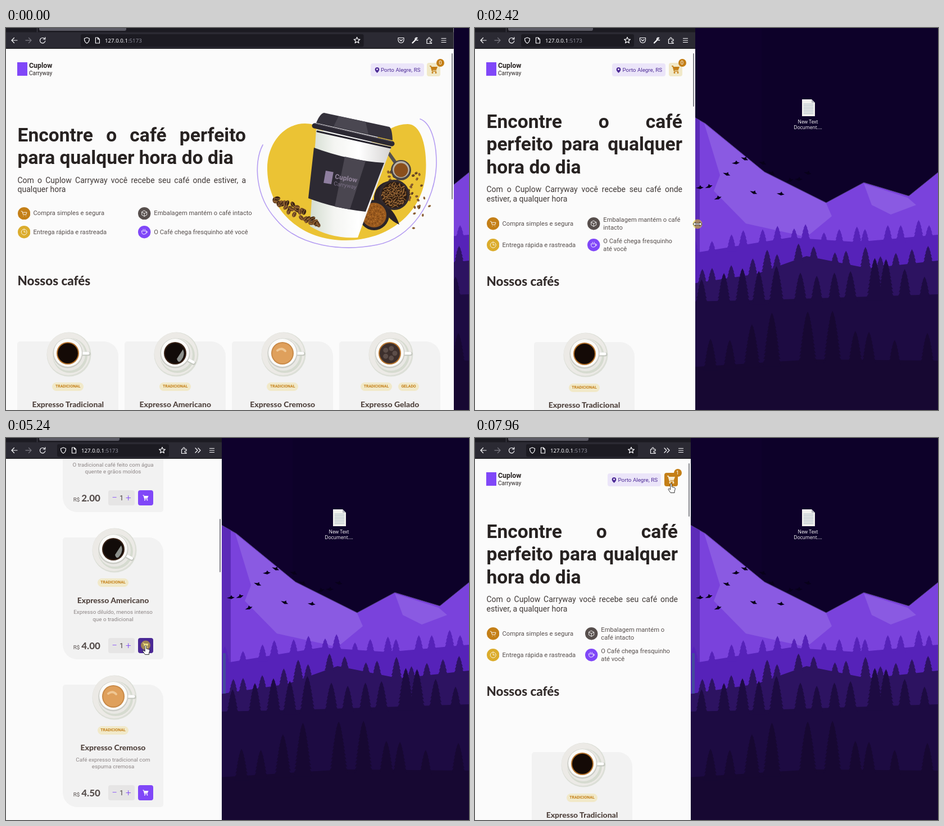
Write an HTML page that moves like this. It is 824 px wide and 680 px high and loops after 8 s.

```html
<!DOCTYPE html>
<html lang="pt-BR">
<head>
<meta charset="utf-8">
<title>Loja de cafés</title>
<style>
html, body { margin: 0; width: 100%; height: 100%; overflow: hidden; background: #0d0129; }
#stage { position: absolute; left: 0; top: 0; width: 824px; height: 680px; overflow: hidden; font-family: Roboto, sans-serif; }
#stage > svg { position: absolute; left: 0; top: 0; }
#win, #view { position: absolute; left: 0; overflow: hidden; }
#win { top: 0; height: 680px; background: #fff; }
#view { top: 37px; height: 643px; background: #fbfbfb; }
#bar { position: absolute; left: 0; top: 0; }
#page { position: absolute; left: 0; top: -37px; box-sizing: border-box; padding: 147px 23.5px 0 20.5px; }
#page > svg, .abs { position: absolute; }
h1, h2, h3, p { margin: 0; }
#hero { display: flex; flex-direction: column; justify-content: center; }
h1 { font-size: 33.6px; line-height: 40.32px; color: #272221; text-align: justify; }
#hero p { margin: 11.2px 0 22.4px; font-size: 14px; line-height: 16.8px; color: #403937; text-align: justify; }
#feats { display: grid; grid-template-columns: 1fr 1fr; gap: 11.2px; }
#feats div { display: flex; align-items: center; gap: 5.6px; font-size: 11.2px; line-height: 13.44px; color: #574f4d; }
#feats svg { flex: none; }
h2, h3, .price b { font-family: Lato, sans-serif; font-weight: 800; }
h2 { margin-top: 37px; font-size: 22.4px; line-height: 28px; color: #332c2b; }
#cards { display: flex; flex-wrap: wrap; justify-content: center; gap: 45px 11.4px; margin: 94px -2px 0; }
.card { position: relative; width: 179.6px; height: 217.5px; background: #f2f2f2; border-radius: 5px 26px 5px 26px; text-align: center; }
.card > * { position: absolute; }
.cup { left: 50px; top: -20px; }
.tags { top: 73.5px; width: 100%; display: flex; justify-content: center; gap: 11px; }
.tags b { height: 15px; line-height: 15.5px; padding: 0 5.6px; border-radius: 8px; background: #f1e9c9; color: #c47f17; font-size: 6.9px; }
h3 { top: 102px; width: 100%; font-size: 14px; line-height: 19px; color: #51443f; }
.card p { top: 127.5px; width: 100%; font-size: 9.8px; line-height: 12.5px; color: #8d8686; white-space: nowrap; }
.price { left: 19px; top: 182px; font-size: 9.8px; line-height: 22px; color: #574f4d; }
.price b { font-size: 17px; margin-left: 3px; }
.qty { left: 81px; top: 179px; width: 47.5px; height: 27px; border-radius: 4px; background: #e6e5e5; font-size: 12px; line-height: 27px; color: #403937; }
.qty i { font: 300 17px/26px Roboto, sans-serif; color: #8047f8; vertical-align: -1px; margin: 0 4px; }
.add { left: 134px; top: 179px; border-radius: 4px; background: #8047f8; }
#pill { right: 53px; top: 63px; width: 95px; height: 23px; border-radius: 4px; background: #ebe5f9; color: #4b2995; font-size: 9.8px; line-height: 23px; white-space: nowrap; }
#pill span { position: absolute; left: 18.5px; }
#basket { right: 23.5px; top: 62px; border-radius: 4px; }
#badge { right: 16.5px; top: 55px; width: 14px; height: 14px; border-radius: 50%; background: #c47f17; color: #fff; font-size: 9.5px; line-height: 14.5px; text-align: center; }
#thumb { position: absolute; width: 2px; border-radius: 1px; background: #85858c; }
#toast { position: absolute; left: 148px; top: 50px; width: 219px; height: 45.5px; background: #fff; border-radius: 3px; box-shadow: 0 1px 7px rgba(0,0,0,.18); overflow: hidden; color: #757575; font-size: 11.3px; line-height: 46px; }
#toast span { position: absolute; left: 31px; }
#left { position: absolute; bottom: 0; left: 0; width: 100%; height: 3.5px; background: #07bc0c; transform-origin: left; }
</style>
</head>
<body>
<div id="stage">
  <svg id="wall" width="824" height="680"></svg>
  <div id="win">
    <div id="view"><div id="page">
      <svg width="90" height="40" style="left:16px;top:54px" viewBox="16 54 90 40">
        <rect x="20" y="61" width="18" height="24" fill="#8047f8"/>
        <text x="41" y="71" font-size="12.4" font-weight="700" fill="#272221">Cuplow</text>
        <text x="41" y="84" font-size="10" fill="#272221">Carryway</text>
      </svg>
      <div id="pill" class="abs"><svg class="abs" style="left:7px;top:6px" width="9" height="12"><path d="M4.500 11Q0 7 .7 4A3.900 3.900 0 0 1 8.300 4Q9 7 4.500 11Z" fill="#4b2995"/><circle cx="4.500" cy="4.400" r="1.500" fill="#ebe5f9"/></svg><span>Porto Alegre, RS</span></div>
      <svg id="basket" width="24" height="24" viewBox="-12 -12 24 24"></svg>
      <div id="badge" class="abs">0</div>
      <svg id="art" width="340" height="260" viewBox="440 140 340 260" style="top:140px"></svg>
      <div id="hero">
        <h1>Encontre o café perfeito para qualquer hora do dia</h1>
        <p>Com o Cuplow Carryway você recebe seu café onde estiver, a qualquer hora</p>
        <div id="feats"></div>
      </div>
      <h2>Nossos cafés</h2>
      <div id="cards"></div>
    </div></div>
    <svg id="bar" width="824" height="37"></svg>
    <div id="thumb"></div>
    <div id="toast">
      <svg class="abs" width="219" height="46"><circle cx="17" cy="23" r="7" fill="#07bc0c"/><path d="M13.500 23l2.500 2.600 4.600-5.200" fill="none" stroke="#fff" stroke-width="1.500"/><path d="M204.500 9l6 6m0-6l-6 6" stroke="#999" stroke-width="1.200"/></svg>
      <span>Adicionado ao carrinho</span><div id="left"></div>
    </div>
  </div>
  <svg id="mouse" width="824" height="680"></svg>
</div>
<script>
const $ = id => document.getElementById(id);
const LOOP = 8000;
let seed = 7;
const rnd = () => (seed = (seed * 16807) % 2147483647) / 2147483647;
const spread = w => (rnd() - .5) * w;

const part = (t, a, b) => Math.min(1, Math.max(0, (t - a) / (b - a)));
const smooth = k => k * k * (3 - 2 * k);
const back = k => 1 + 2.7 * (k - 1) ** 3 + 1.7 * (k - 1) ** 2;
// Eased moves, each [start, end, value reached]
const glide = (t, from, ...moves) =>
  moves.reduce((v, [a, b, to]) => v + (to - v) * smooth(part(t, a, b)), from);

const line = (d, color, w = 1) =>
  `<path d="${d}" fill="none" stroke="${color}" stroke-width="${w}" stroke-linecap="round" stroke-linejoin="round"/>`;
const shape = (d, fill) => `<path d="${d}" fill="${fill}"/>`;
const disc = (x, y, r, fill) => `<circle cx="${x}" cy="${y}" r="${r}" fill="${fill}"/>`;
const move = (x, y, s) => `<g transform="translate(${x} ${y})">${s}</g>`;
const repeat = (n, f) => Array.from({ length: n }, (_, i) => f(i)).join('');

const cartIcon = c => shape('M-7 -7h2.600l.9 2H7l-2.300 6h-6.600l.3 1H5v1.500h-8l-1-3.500-1.600-5.500H-7Z', c) +
  disc(-2, 5.5, 1.5, c) + disc(4, 5.5, 1.5, c);

/* ---- desktop ---- */
// Fir with a jagged outline, mirrored around x
function tree(x, top, base) {
  const h = base - top, w = Math.min(17, 5 + h * .14), n = Math.ceil(h / 7);
  const side = s => Array.from({ length: n }, (_, i) => {
    const y = top + h * (i + 1) / n, k = s * w * ((i + 1) / n) ** .65;
    return [`${x + k} ${y}`, `${x + k * .78} ${y}`];
  });
  return `M${x} ${top}L${side(-1).flat().join('L')}L${side(1).flat().reverse().join('L')}Z`;
}

// Height of a ridge at x, from a few [x, y] points
function ridgeAt(x, pts) {
  const i = Math.max(1, pts.findIndex(p => p[0] >= x));
  const [a, b] = [pts[i - 1], pts[i]];
  return a[1] + (b[1] - a[1]) * part(x, a[0], b[0]);
}

function hill(pts, color, count, height) {
  const firs = repeat(count, i => {
    const x = 384 + 440 * (i + .2 + .6 * rnd()) / count, y = ridgeAt(x, pts);
    return tree(x, y - height * (.45 + .7 * rnd()), y + 8);
  });
  return shape(`M380 680L${pts.join('L')}V680Z`, color) + shape(firs, color);
}

function drawWall() {
  const peaks = [[380, 153], [410, 170], [515, 256], [625, 311], [692, 275], [772, 299], [824, 257]];
  let s = '<rect width="824" height="680" fill="#0d0129"/><rect x="380" width="130" height="300" fill="#12022f" opacity=".6"/>';
  s += hill(peaks, '#7a42dc', 0) + line(`M${peaks.join('L')}`, '#4d3b78');
  s += shape('M408 170L515 257 625 312 635 335 590 372 482 348 425 290 436 262Z', '#8a5ae2');
  s += shape('M692 277L770 302 785 315 740 332 706 315Z', '#8a5ae2');
  s += shape('M380 154L400 164V400H380Z', '#5c2bb8');
  s += hill([[380, 402], [560, 373], [680, 381], [824, 368]], '#5622b9', 16, 27);
  s += hill([[380, 456], [500, 438], [590, 406], [700, 428], [824, 414]], '#2d1361', 15, 34);
  s += hill([[380, 487], [520, 484], [640, 480], [824, 474]], '#1d0b42', 13, 64);
  s += hill([[380, 604], [600, 590], [824, 592]], '#170832', 10, 80);
  s += '<rect x="386" y="383" width="5" height="72" fill="#3b5a92" opacity=".7"/>';
  s += repeat(13, i => `<path transform="translate(${400 + i * 16} ${262 + i * 3 + spread(90)}) rotate(${spread(60)})" fill="#08011a" d="M-7 1L-1 -1 1 -4 3 -1 7 0 1 3Z"/>`);
  s += shape('M582 127h17l6 6v24h-23Z', '#f2f2ee') + shape('M599 127v6h6Z', '#b9bcc0');
  s += repeat(8, i => line(`M585 ${135 + i * 2.5}H602`, '#9fb0bd', .8));
  s += '<g fill="#fff" font-family="Open Sans, sans-serif" font-size="8.500" text-anchor="middle"><text x="592.500" y="169.500">New Text</text><text x="592.500" y="179.500">Document....</text></g>';
  $('wall').innerHTML = s;
}

/* ---- hero picture ---- */
const bean = (x, y, r) =>
  `<g transform="translate(${x} ${y}) rotate(${rnd() * 180})"><ellipse rx="${r}" ry="${r * .68}" fill="${rnd() < .5 ? '#6b4423' : '#3d2413'}"/>${line(`M${-r} 0Q0 ${r * .4} ${r} 0`, '#c08a4a', .8)}</g>`;
// Sunflower packing inside a bowl
const heap = (x, y, n, f) => repeat(n, i => {
  const q = 2.5 * Math.sqrt(i);
  return f(x + q * Math.cos(i * 2.4), y + q * Math.sin(i * 2.4), i);
});

function drawArt() {
  let s = '<defs><linearGradient id="paper"><stop offset="0" stop-color="#d3dccf"/><stop offset=".3" stop-color="#f4f5f2"/><stop offset=".6" stop-color="#fff"/><stop offset="1" stop-color="#d5d3d2"/></linearGradient></defs>';
  s += shape('M465 250C465 205 495 170 532 170C575 170 575 215 610 217C650 220 670 171 715 171C740 171 750 215 747 258C742 330 680 378 605 378C520 378 465 320 465 250Z', '#ebc334');
  s += line('M457 208C440 240 444 300 480 340C520 390 600 398 660 386C720 375 765 310 766 240C766 200 755 168 737 162', '#b49cf2', 1.6);
  s += repeat(40, () => bean(708 + spread(56), 288 + spread(64), 2.8));
  s += repeat(6, () => bean(735 + spread(50), 310 + spread(110), 2.5));
  s += shape('M655 300Q660 270 694 272Q690 296 655 318Z M668 312Q690 320 700 350Q676 340 668 312Z', '#2a2226');
  s += line('M682 224L694 241', '#55504f', 6);
  s += disc(703, 253, 18, '#4a4545') + disc(703, 252, 15, '#b9b1a6') + disc(703, 253, 12.5, '#8a4f1c');
  s += disc(691, 297, 27, '#332a2c') + disc(691, 297, 23, '#2a1a10') + heap(691, 297, 75, (x, y) => bean(x, y, 2.6));
  s += disc(655, 333, 27, '#2b2529') + disc(655, 333, 22, '#9a5a1e') + heap(655, 333, 60, (x, y, i) => disc(x, y, 1, i % 2 ? '#c27a2e' : '#6e3c12'));
  s += shape('M552 180L686 211 626 373Q580 376 541 353Z', 'url(#paper)');
  s += shape('M548 213Q610 236 673 240L640 327Q585 321 538 303Z', '#2d2a33');
  s += shape('M603 229L640 237 612 323 585 318Z', '#4a4650');
  s += shape('M566 151L682 176Q687 178 688 200L552 169Q559 152 566 151Z', '#35323c');
  s += shape('M592 157L640 167 645 189 583 175Z', '#4a4751');
  s += line('M549 174L687 206', '#2b2832', 9) + line('M550 170L687 202', '#55515c', 1.5) + line('M554 184L684 213', '#24212b', 3);
  s += '<g transform="translate(569 254) rotate(10)"><rect width="14" height="22" fill="#8f7fa0"/><text x="18" y="11" font-size="12" font-weight="700" fill="#93859c">Cuplow</text><text x="18" y="23" font-size="10" fill="#7d7288">Carryway</text></g>';
  s += repeat(32, i => bean(478 + i * 2.5, 304 + i * 1.4 + spread(22) * Math.sin(.4 + i * .08), 5.2));
  $('art').innerHTML = s;
}

/* ---- features and cards ---- */
function drawShop() {
  const feats = [
    ['#c47f17', 'Compra simples e segura', 'M-5 -4h1.500l2 6h5l1.300-4h-7.400M-1.300 4.500h.1M3.300 4.500h.1'],
    ['#574f4d', 'Embalagem mantém o café intacto', 'M0 -5l4.500 2.500v5L0 5l-4.500-2.500v-5ZM-4.500 -2.500L0 0l4.500-2.500M0 0v5'],
    ['#dbac2c', 'Entrega rápida e rastreada', 'M0 -5a5 5 0 1 0 .01 0ZM0 -3v3h2.500'],
    ['#8047f8', 'O Café chega fresquinho até você', 'M-4.500 -2h8v2q0 4-4 4t-4-4ZM3.500 -1.500q2 0 2 1.500t-2 1.500M-2 -5v1.500M1 -5v1.500']
  ];
  $('feats').innerHTML = feats.map(([color, text, icon]) =>
    `<div><svg width="22.400" height="22.400" viewBox="-11.200 -11.200 22.400 22.400">${disc(0, 0, 11.2, color)}${line(icon, '#fff', .9)}</svg><span>${text}</span></div>`).join('');

  const coffee = (rim, fill, extra) => disc(0, 0, 20, rim) + disc(0, 0, 18, fill) + extra;
  const ice = repeat(5, i => disc(9 * Math.cos(i * 1.26), 9 * Math.sin(i * 1.26), 4.5, '#5c4d48'));
  const drinks = [
    ['Expresso Tradicional', 'O tradicional café feito com água<br>quente e grãos moídos', '2.00', coffee('#b5722c', '#140a06', '')],
    ['Expresso Americano', 'Expresso diluído, menos intenso<br>que o tradicional', '4.00', coffee('#3a2418', '#120b09', shape('M3 10L14 -7Q18 2 12 11T3 10Z', '#8d908c'))],
    ['Expresso Cremoso', 'Café expresso tradicional com<br>espuma cremosa', '4.50', coffee('#c98a48', '#dfa05c', line('M-9 -5q8 -6 14 1', '#efc794', 4))],
    ['Expresso Gelado', 'Bebida preparada com café<br>expresso e cubos de gelo', '5.00', coffee('#b5722c', '#3d2f2c', ice)]
  ];
  const cup = (drink, tilt) => `<svg class="cup" width="84" height="84" viewBox="-42 -42 84 84">` +
    disc(0, 1, 39.5, '#dcdfd7') + disc(-1, 0, 38, '#eceae6') + disc(2, 3, 31, '#d6dbd0') + disc(0, 1, 29, '#e9e8e4') +
    `<g transform="rotate(${tilt})">${line('M24 0H35', '#c4c7bf', 7)}${line('M24 -1H34', '#fff', 5)}</g>` +
    disc(-2, -1, 26.5, '#cbccc6') + disc(-2, -2, 25, '#fbfbf9') + move(-2, -1, drink) + '</svg>';
  $('cards').innerHTML = drinks.map(([name, text, price, drink], i) => `<div class="card">${cup(drink, i === 1 ? 28 : 0)}
    <div class="tags"><b>TRADICIONAL</b>${i === 3 ? '<b>GELADO</b>' : ''}</div>
    <h3>${name}</h3><p>${text}</p><div class="price">R$<b>${price}</b></div><div class="qty"><i>−</i>1<i>+</i></div>
    <svg class="add" width="27" height="27" viewBox="-18.700 -18.700 37.400 37.400">${cartIcon('#fff')}</svg></div>`).join('');
}

/* ---- browser bar ---- */
function drawBar(w) {
  const small = w < 389, gap = small ? 9 : Math.max(0, .138 * w - 59), c = '#fbfbfe';
  const x = 82 + gap, r = small ? w - 94 : w - 109 - gap;
  const icon = (x, d, width = 1.2) => move(x, 22, line(d, c, width));
  let s = `<rect width="${w}" height="37" fill="#1c1b22"/><rect y="7.500" width="${w}" height="28.500" fill="#2b2a33"/><rect y="36" width="${w}" height="1" fill="#0c0c0d"/>`;
  s += `<rect x="59" y="-5" width="${Math.min(214, w - 182) - 59}" height="10" rx="3" fill="#5b5a64"/>` + line('M55.500 0V7', '#45444e');
  s += icon(15, 'M5 0H-5m4.500-4.500L-5 0l4.500 4.500') + line('M35 22H45m-4.500-4.500L45 22l-4.500 4.500', '#74737c', 1.3);
  s += icon(65, 'M4 -2.500a4.700 4.700 0 1 0 .8 3.500M4.800 -5.500v3.500h-3.500');
  s += `<rect x="${x}" y="11" width="${r - x}" height="22.500" rx="3" fill="#1c1b22"/>`;
  s += icon(x + 11, 'M0 -5l4.500 1.700q0 6.300-4.500 8.500q-4.500-2.200-4.500-8.500Z') + icon(x + 30, 'M-3.500 -5h4l3 3v7h-7ZM.5 -5v3h3');
  s += `<text x="${x + 43}" y="25.600" font-family="Noto Sans, sans-serif" font-size="9.700" fill="${c}">127.0.0.1<tspan fill="#8f8f9d">:5173</tspan></text>`;
  const star = Array.from({ length: 10 }, (_, i) => {
    const q = i % 2 ? 2.6 : 5.7;
    return `${q * Math.sin(i * Math.PI / 5)} ${-q * Math.cos(i * Math.PI / 5)}`;
  });
  s += icon(r - 12, `M${star.join('L')}Z`);
  s += icon(small ? w - 67 : w - 43, 'M-4.500 -2h2.500v-2q1.500-2.500 3 0v2h3v3h-2q-2 1.500 0 3h2v1.500h-8.500Z');
  if (small) s += icon(w - 43, 'M-4 -4l4 4-4 4M1 -4l4 4-4 4');
  else {
    s += icon(w - 93.5, 'M-5 -4.500h10v3.500q0 5-5 5.500q-5-.5-5-5.500ZM-2.500 -1.500L0 1l2.500-2.500');
    s += icon(w - 68.5, 'M-4.500 4.500L1 -1', 2.4) + icon(w - 68.5, 'M4 -4.500L1.500 -2q1 2.500 3.500 1.500M4 -4.500q-4-1-4 3', 1.5);
  }
  s += icon(w - 17.5, 'M-4 -3.500h8M-4 0h8M-4 3.500h8');
  $('bar').innerHTML = s;
}

/* ---- motion ---- */
const edgeAt = t => glide(t, 796.5, [1110, 2420, 392], [2620, 2800, 384]);
const scrollAt = t => glide(t, 0, [3380, 3990, 425], [4070, 4500, 645], [5682, 6460, 0]);

// Stops of the pointer: [start, end, x, y]
const stops = [[70, 600, 801, 349], [2820, 3150, 273, 321], [4820, 5120, 248.5, 369], [5350, 5560, 267, 250], [6100, 7000, 349, 81]];
const dragging = t => t > 600 && t < 2820;

function drawMouse(t) {
  const x = dragging(t) ? edgeAt(t + 50) + 4 : glide(t, t < 2820 ? 834 : 388, ...stops.filter(s => t < 2820 || s[0] > 2000).map(([a, b, v]) => [a, b, v]));
  const y = glide(t, 560, ...stops.map(([a, b, , v]) => [a, b, v]));
  const hand = (t > 5060 && t < 5400) || t > 6800;
  const press = (t > 1060 && t < 2780) || (t > 5190 && t < 5310);
  const d = dragging(t) ? 'M-8 0l4-3.500v2.300h8v-2.300l4 3.500-4 3.500v-2.300h-8v2.300Z'
    : hand ? 'M-1.300 1q1.300-2 2.600 0V6l4.500 1.200q1.800.6 1.500 2.500L6 14v2.500H-1L-5 10.500q0-1.800 1.800-1.200L-1.300 11Z'
    : 'M0 0V12L3 9.300 5 13.500 6.800 12.700 4.900 8.600H8.800Z';
  $('mouse').innerHTML = move(x, y, (press ? disc(0, 0, 8.5, 'rgba(224,200,40,.58)') : '') +
    `<path d="${d}" fill="#fff" stroke="#222" stroke-width=".9" stroke-linejoin="round"/>`);
}

function drawToast(t) {
  const k = t < 6900 ? part(t, 5260, 5960) : 1 - part(t, 6950, 7290);
  $('toast').style.display = k > 0 ? 'block' : 'none';
  $('toast').style.transform = `translateX(${270 * (1 - back(k))}px)`;
  $('left').style.transform = `scaleX(${1 - part(t, 5960, 6950)})`;
}

function render(t) {
  const edge = edgeAt(t), scroll = scrollAt(t);
  const strip = t < 2420 ? edge - edgeAt(t + 25) : 0; // frame not yet repainted
  const inner = edge - strip, two = edge >= 538;
  const textW = two ? 342 + (edge - 719) * .833 : edge - 43.5;

  $('win').style.width = edge + 'px';
  $('view').style.width = inner + 'px';
  $('page').style.width = edge + 'px';
  $('page').style.transform = `translateY(${-scroll}px)`;
  $('hero').style.width = textW + 'px';
  $('hero').style.minHeight = two ? '251.5px' : 0;
  $('feats').style.width = textW + (edge > 760 ? 12 : 0) + 'px';
  $('art').style.display = two ? 'block' : 'none';
  $('art').style.left = edge - 357 + 'px';
  drawBar(inner);

  const thumb = $('thumb').style;
  thumb.left = edge - 4 + 'px';
  thumb.top = 45 + scroll * .1533 + 'px';
  thumb.height = 40 + 55 * Math.floor((edge - 30) / 191) + 'px';
  thumb.opacity = strip > 2 ? 0 : 1;

  const over = t > 6980;
  $('basket').style.background = over ? '#c47f17' : '#f1e9c9';
  $('basket').innerHTML = cartIcon(over ? '#f6ecd2' : '#c47f17');
  $('badge').textContent = t > 5260 ? 1 : 0;
  document.querySelectorAll('.add')[1].style.background = t > 5080 && t < 5400 ? '#4b2995' : '#8047f8';
  drawMouse(t);
  drawToast(t);
}

drawWall();
drawArt();
drawShop();
const start = performance.now();
function frame() {
  render((performance.now() - start) % LOOP);
  requestAnimationFrame(frame);
}
frame();
</script>
</body>
</html>
```
